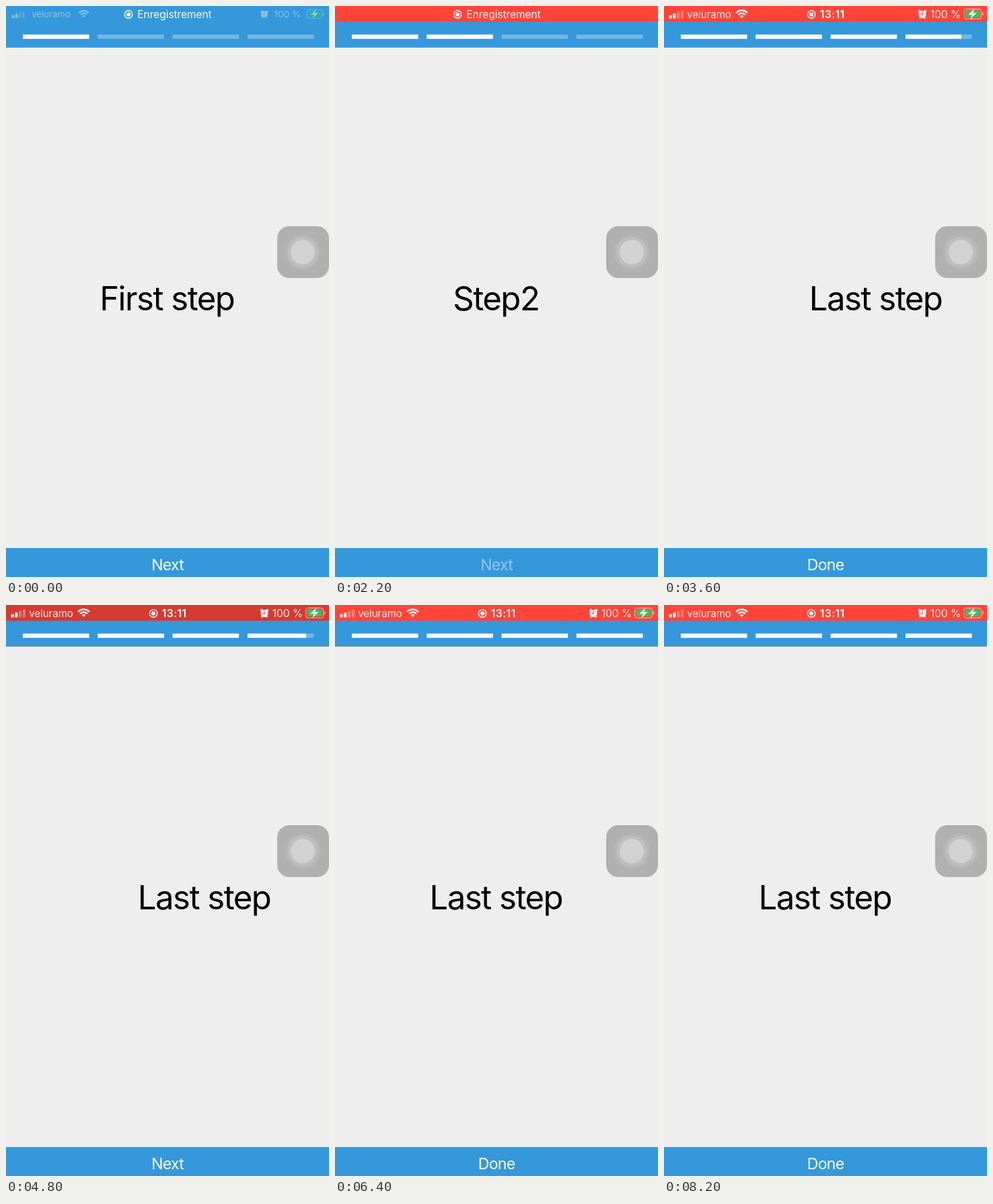
These frames come from a looping animation (480 by 848 pixels, 8.3 s). An HTML page with a canvas:

```html
<!DOCTYPE html>
<html lang="en">
<head>
<meta charset="utf-8">
<title>Step wizard</title>
<style>
  html, body { margin: 0; width: 100%; height: 100%; overflow: hidden; background: #eee; }
  canvas { display: block; width: 480px; height: 848px; }
</style>
</head>
<body>
<canvas id="stage" width="480" height="848"></canvas>
<script>
const ctx = document.getElementById('stage').getContext('2d');
const LOOP = 8300, STEP = 100, SLIDE = 500;
const BLUE = '#3498db', WHITE = '#fff';
const FONT = 'Inter, sans-serif';
const TIGHT = -.03; // tracking of the large text, in em
const pages = ['First step', 'Step2', 'Step3', 'Last step'];

// Page changes: start time, target page, whether the button was pressed
const moves = [
  { at: 1200, to: 1, press: true },
  { at: 2250, to: 2, press: true },
  { at: 3240, to: 3, press: true },
  { at: 4680, to: 2, press: false },
  { at: 5600, to: 3, press: true }
];

const clamp = v => Math.min(1, Math.max(0, v));
const ramp = (t, from, to) => clamp((t - from) / (to - from));
const mix = (a, b, k) => a + (b - a) * k;
const ease = k => k < .5 ? 2 * k * k : 1 - 2 * (1 - k) * (1 - k);

function rect(x, y, w, h, color) {
  ctx.fillStyle = color;
  ctx.fillRect(x, y, w, h);
}

function round(x, y, w, h, r, color) {
  ctx.fillStyle = color;
  ctx.beginPath();
  ctx.roundRect(x, y, w, h, r);
  ctx.fill();
}

function disc(x, y, r, color) {
  ctx.fillStyle = color;
  ctx.beginPath();
  ctx.arc(x, y, r, 0, 7);
  ctx.fill();
}

function arc(x, y, r, width, from = 0, to = 2 * Math.PI) {
  ctx.strokeStyle = WHITE;
  ctx.lineWidth = width;
  ctx.beginPath();
  ctx.arc(x, y, r, from, to);
  ctx.stroke();
}

function poly(points, color) {
  ctx.fillStyle = color;
  ctx.beginPath();
  points.forEach(p => ctx.lineTo(...p));
  ctx.fill();
}

// Centred text; tracking is in em
function text(str, x, y, size, { color = WHITE, weight = 400, tracking = 0 } = {}) {
  const spacing = tracking * size;
  ctx.font = `${weight} ${size}px ${FONT}`;
  ctx.letterSpacing = spacing + 'px';
  ctx.textAlign = 'center';
  ctx.fillStyle = color;
  ctx.fillText(str, x + spacing / 2, y);
}

function faded(alpha, draw) {
  if (alpha <= 0) return;
  ctx.save();
  ctx.globalAlpha *= alpha;
  draw();
  ctx.restore();
}

// Runs draw with the origin at x, y and the given scale
function placed(x, y, scale, draw) {
  ctx.save();
  ctx.translate(x, y);
  ctx.scale(scale, scale);
  draw();
  ctx.restore();
}

function signal() {
  [5, 7.5, 10, 12].forEach((h, i) =>
    round(-10.5 + i * 5.8, 6 - h, 4, h, 1, i < 2 ? WHITE : 'rgba(255,255,255,.35)'));
}

function wifi() {
  const from = -Math.PI * .76, to = -Math.PI * .24;
  arc(0, 6, 11.5, 2.5, from, to);
  arc(0, 6, 7.3, 2.4, from, to);
  poly([[0, 6], [-3, 2.8], [0, 1.7], [3, 2.8]], WHITE);
}

function alarm() {
  disc(0, .5, 5.5, WHITE);
  disc(-4.3, -4.3, 2, WHITE);
  disc(4.3, -4.3, 2, WHITE);
  rect(-4.8, 4.5, 2, 2, WHITE);
  rect(2.8, 4.5, 2, 2, WHITE);
  rect(-.6, -3, 1.3, 4.3, '#e8564d');
  rect(-3.2, .3, 3.8, 1.2, '#e8564d');
}

function battery() {
  ctx.strokeStyle = 'rgba(255,255,255,.6)';
  ctx.lineWidth = 1.3;
  ctx.beginPath();
  ctx.roundRect(-13.5, -7.3, 26, 14.6, 4);
  ctx.stroke();
  round(-11.3, -5.2, 21.6, 10.4, 2.5, '#34c759');
  round(13.8, -2.5, 1.7, 5, 1, 'rgba(255,255,255,.6)');
  poly([[2.5, -8], [-7, 1.5], [-1.3, 1.5], [-3.8, 8], [5.7, -1.5], [.2, -1.5]], WHITE);
}

function statusBar(t) {
  // Pulsing red with a bright plateau around every even second
  const phase = (t % 2000) / 2000;
  const dim = Math.max(0, Math.min(phase, 1 - phase) - .2) * .8;
  const shade = [255, 69, 58].map(c => Math.round(c * (1 - dim)));
  faded(ramp(t, 0, 400), () => rect(0, 0, 480, 23.4, `rgb(${shade})`));

  const clock = ramp(t, 2700, 3000);
  const sides = t < 1000 ? .45 * (1 - ramp(t, 0, 200)) : clock;
  const scale = .78 + .22 * sides;
  faded(sides * .92, () => {
    placed(18, 12.5, scale, signal);
    placed(67, 12, scale, () => text('veluramo', 0, 5.5, 15));
    placed(115.5, 12, scale, wifi);
    placed(384, 12, scale, alarm);
    placed(418.5, 12, scale, () => text('100 %', 0, 5.5, 15.5));
    placed(459, 11.8, scale, battery);
  });

  const x = mix(182, 219, clock);
  arc(x, 12.5, 5.7, 1.4);
  disc(x, 12.5, 3, WHITE);
  faded(1 - clock, () => text('Enregistrement', 250.5, 17.8, 15.4));
  faded(clock, () => text('13:11', 250, 17.8, 15.5, { weight: 600, tracking: .03 }));
}

function progressBars(pos) {
  for (let i = 0; i < 4; i++) {
    const x = 25 + i * 111.3;
    rect(x, 42.5, 98.5, 6.2, 'rgba(255,255,255,.3)');
    rect(x, 42.5, 98.5 * clamp(pos - i + 1), 6.2, WHITE);
  }
}

function floatingButton() {
  round(403, 327, 77, 77, 18, '#b0b0b0');
  disc(441, 365.5, 27, '#b5b5b5');
  disc(441, 365.5, 23, '#bebebe');
  disc(441, 365.5, 18, '#d2d2d2');
}

function draw(t) {
  let pos = 0, target = 0, dim = 0;
  for (const { at, to, press } of moves) {
    if (press) dim = Math.max(dim, ramp(t, at - 150, at) * (1 - ramp(t, at, at + 250)));
    if (t < at) continue;
    pos = mix(pos, to, ease(ramp(t, at, at + SLIDE)));
    target = to;
  }

  rect(0, 0, 480, 848, '#eee');
  pages.forEach((title, i) =>
    text(title, 240 + (i - pos) * 480, 452, 49, { color: '#000', tracking: TIGHT }));

  rect(0, 0, 480, 61, BLUE);
  rect(0, 61, 480, 1, '#8a9aa5');
  statusBar(t);
  progressBars(pos);
  floatingButton();

  rect(0, 804, 480, 1, '#dff6fb');
  rect(0, 805, 480, 43, BLUE);
  faded(1 - .8 * dim, () =>
    text(target === 3 ? 'Done' : 'Next', 240.5, 838, 23, { tracking: TIGHT }));
}

function tick() {
  draw(Math.floor(performance.now() % LOOP / STEP) * STEP);
  requestAnimationFrame(tick);
}
tick();
</script>
</body>
</html>
```
